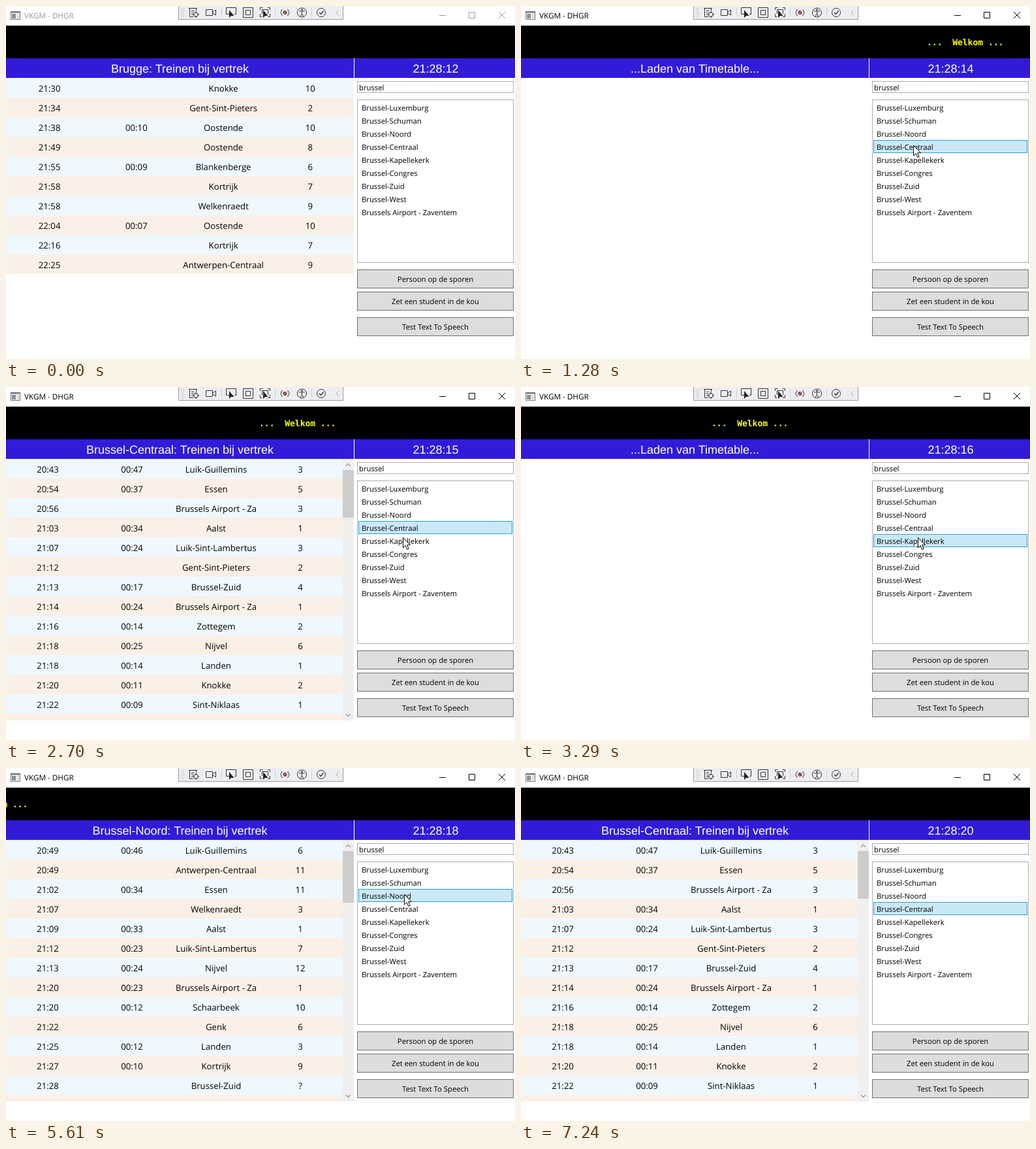
An HTML page for the animation above (8.04 s loop, 780 px wide and 540 px high).

```html
<!DOCTYPE html>
<html lang="nl">
<head>
<meta charset="utf-8">
<title>Vertrektijden</title>
<style>
  html, body { margin: 0; width: 100%; height: 100%; overflow: hidden; background: #fff; }
  #stage { position: relative; width: 780px; height: 540px; overflow: hidden; }
  svg { position: absolute; inset: 0; }
  svg, .board { font: 11.3px "Open Sans", "Noto Sans", sans-serif; text-rendering: geometricPrecision; }
  .middle { text-anchor: middle; }
  .head { font: 18px "Liberation Sans", Arial, sans-serif; fill: #fff; text-anchor: middle; }
  .ticker { font: bold 13px "DejaVu Sans Mono", monospace; fill: #ff0; white-space: pre; }
  .line { fill: none; stroke: #333; }
  .field { fill: #fff; stroke: #abadb3; }
  .button { fill: #ddd; stroke: #707070; }
  .selected { fill: #cbe8f6; stroke: #26a0da; }
  .hover { fill: #e5f3fb; stroke: #70c0e7; }
  .board { position: absolute; left: 0; top: 110px; width: 533px; max-height: 400px; overflow: hidden; font-size: 13.2px; }
  .board.long { height: 400px; }
  .row { display: grid; grid-template-columns: repeat(4, 1fr); height: 30px; background: #f0f8ff; }
  .row:nth-child(even) { background: #faf0e6; }
  .long .row { width: 516px; }
  .row span { margin: 0 2.5px; min-width: 0; overflow: hidden; white-space: nowrap; text-align: center; line-height: 32px; height: 30px; }
  .long .row span { position: relative; left: -.5px; }
  .bar { position: absolute; right: 0; top: 0; width: 17px; height: 400px; background: #f0f0f0; }
  .bar i { position: absolute; top: 17px; width: 17px; background: #cdcdcd; }
</style>
</head>
<body>
<div id="stage">
  <svg width="780" height="540" id="ui">
    <!-- window frame -->
    <rect x="7.5" y="8.5" width="14" height="12" fill="#f4f4f4" stroke="#777"/>
    <path d="M7 9.5h15" stroke="#777" stroke-width="2"/>
    <path d="M9 12h6v7H9z" fill="#8b8f96"/>
    <path d="M16.5 13h4m-4 2.5h4m-4 2.5h4" stroke="#bbb"/>
    <g id="frame">
      <text x="28" y="18.5" style="font-size:11.7px">VKGM - DHGR</text>
      <path d="M664 14.5h10M709.5 9.5h9v9h-9zM755 9l10 10m0-10-10 10" fill="none" stroke="currentColor"/>
    </g>
    <!-- floating toolbar -->
    <path d="M264.5-1v21.500h252V-1z" fill="#eeeef2" stroke="#9b9ba3"/>
    <path d="M268.500 3v15M272.500 3v15" stroke="#999" stroke-dasharray="1 3"/>
    <path d="M270.500 5v13" stroke="#999" stroke-dasharray="1 3"/>
    <path d="M330.500 3v14M412.500 3v14M468.500 3v14" stroke="#ccced6"/>
    <g class="line">
      <path d="M287 16.500h-5.500v-13h10v4M280 3.500h13M284 7.500h4m-4 3h3m-3 3h2"/>
      <circle cx="291" cy="13" r="3.500"/><path d="M291 8v3m0 4v3m-5-5h3m4 0h3"/>
      <path d="M306.500 5.500h10v9h-10zM317 9l4.500-3v8L317 11"/>
      <path d="M343 12.500h-5.500v-10h15v10H350M363.500 2.500h15v15h-15zM367.500 6.500h7v7h-7z"/>
      <path d="M389.500 6V2.500h4M401 2.500h3.500V6M389.500 12v4.500h3M401 16.500h3.500V12M392.500 12V5.500h9V12"/>
      <path d="M424 5.500q-2 0-2 2t-1.500 2.500q1.500.5 1.500 2.500t2 2M431 5.500q2 0 2 2t1.500 2.500q-1.500.5-1.500 2.500t-2 2"/>
      <circle cx="453.500" cy="10" r="7"/><path d="M449 8h9m-4.500 0v4m0 0-2.500 4m2.500-4 2.500 4"/>
      <circle cx="483" cy="10" r="6.500"/><path d="M480 10l2.500 2.500 4-5" stroke-width="1.400"/>
    </g>
    <path d="M342 6v12l3-3h4.500zM394 6v12l3-3h4.500z" fill="#222"/>
    <circle cx="453.500" cy="5.800" r="1.300" fill="#333"/>
    <circle cx="427.500" cy="10" r="3" fill="#7d3038"/><path d="M426 11.500l3-3" stroke="#fff"/>
    <path d="M510 6l-4 4 4 4" fill="none" stroke="#aaa"/>
    <!-- banner and headings -->
    <path d="M0 30h780v50H0z"/>
    <text class="ticker" id="ticker" y="60">...  Welkom ...</text>
    <path d="M0 80h780v30H0z" fill="#311bd9"/>
    <path d="M533.500 80v30" stroke="#fff"/>
    <text class="head" id="heading" x="266.500" y="102"></text>
    <text class="head" id="clock" x="658.500" y="102"></text>
    <!-- side panel -->
    <rect class="field" x="538.500" y="115.500" width="239" height="17"/>
    <text x="541" y="129">brussel</text>
    <rect class="field" x="538.500" y="143.500" width="239" height="249"/>
    <rect class="hover" id="hover" x="540.500" width="235" height="19"/>
    <rect class="selected" id="selected" x="540.500" width="235" height="19"/>
    <g id="stations"></g>
    <g id="buttons"></g>
    <path id="cursor" d="M.5.500v15.500l3.600-3.400 2.600 5.900 2.500-1.100-2.600-5.700h4.900z" fill="#fff" stroke="#000"/>
  </svg>
</div>
<script>
const LOOP = 8040;
const $ = id => document.getElementById(id);
const stage = $('stage');

const boards = {
  'Brugge': { rows: `21:30,,Knokke,10|21:34,,Gent-Sint-Pieters,2|21:38,00:10,Oostende,10|21:49,,Oostende,8|
    21:55,00:09,Blankenberge,6|21:58,,Kortrijk,7|21:58,,Welkenraedt,9|22:04,00:07,Oostende,10|
    22:16,,Kortrijk,7|22:25,,Antwerpen-Centraal,9` },
  'Brussel-Centraal': { thumb: 73, rows: `20:43,00:47,Luik-Guillemins,3|20:54,00:37,Essen,5|
    20:56,,Brussels Airport - Zaventem,3|21:03,00:34,Aalst,1|21:07,00:24,Luik-Sint-Lambertus,3|
    21:12,,Gent-Sint-Pieters,2|21:13,00:17,Brussel-Zuid,4|21:14,00:24,Brussels Airport - Zaventem,1|
    21:16,00:14,Zottegem,2|21:18,00:25,Nijvel,6|21:18,00:14,Landen,1|21:20,00:11,Knokke,2|
    21:22,00:09,Sint-Niklaas,1|,,,` },
  'Brussel-Kapellekerk': {},
  'Brussel-Noord': { thumb: 79, rows: `20:49,00:46,Luik-Guillemins,6|20:49,,Antwerpen-Centraal,11|
    21:02,00:34,Essen,11|21:07,,Welkenraedt,3|21:09,00:33,Aalst,1|21:12,00:23,Luik-Sint-Lambertus,7|
    21:13,00:24,Nijvel,12|21:20,00:23,Brussels Airport - Zaventem,1|21:20,00:12,Schaarbeek,10|
    21:22,,Genk,6|21:25,00:12,Landen,3|21:27,00:10,Kortrijk,9|21:28,,Brussel-Zuid,?|,,,` }
};
const stations = ['Brussel-Luxemburg', 'Brussel-Schuman', 'Brussel-Noord', 'Brussel-Centraal',
  'Brussel-Kapellekerk', 'Brussel-Congres', 'Brussel-Zuid', 'Brussel-West', 'Brussels Airport - Zaventem'];
const buttons = [['Persoon op de sporen', 403], ['Zet een student in de kou', 437], ['Test Text To Speech', 476]];

// [time, value]; an empty board name means the timetable is loading
const views = [[0, 'Brugge'], [1180, ''], [1580, 'Brussel-Centraal'], [2800, ''], [3490, 'Brussel-Kapellekerk'],
  [4710, ''], [5110, 'Brussel-Noord'], [6640, ''], [6940, 'Brussel-Centraal']];
const selections = [[0, -1], [1180, 3], [2800, 4], [4710, 2], [6640, 3]];
const tickerPath = [[180, 805], [1280, 622], [2000, 502], [3290, 292], [4510, 96], [5610, -84], [5820, -119]];
const cursorPath = [[380, 499, 395], [980, 601, 213], [2400, 601, 213], [2700, 608, 230], [4210, 608, 230],
  [4510, 609, 203], [4610, 610, 193], [5820, 610, 193], [6220, 611, 214], [6940, 611, 214], [7140, 610, 242]];

// The screen refreshes in runs of 100 ms steps: [start, count]
const ticks = [[0, 1], [180, 18], [2000, 12], [3190, 5], [3710, 21], [5820, 1], [6020, 3], [6640, 1], [6940, 1], [7140, 2]]
  .flatMap(([start, count]) => Array.from({ length: count }, (_, i) => start + i * 100));

const valueAt = (steps, t) => steps.findLast(([start]) => start <= t)[1];

function pointAt(path, t) {
  const i = path.findIndex(([time]) => time >= t);
  if (i < 0) return path.at(-1).slice(1);
  if (i === 0) return path[0].slice(1);
  const [a, b] = [path[i - 1], path[i]];
  const k = (t - a[0]) / (b[0] - a[0]);
  return a.slice(1).map((v, n) => v + (b[n + 1] - v) * k);
}

function build() {
  for (const board of Object.values(boards)) {
    if (!board.rows) continue;
    const el = board.el = document.createElement('div');
    el.className = board.thumb ? 'board long' : 'board';
    el.innerHTML = board.rows.split('|').map(row =>
      `<div class="row">${row.trim().split(',').map(cell => `<span>${cell}</span>`).join('')}</div>`).join('');
    if (board.thumb) el.innerHTML += `<div class="bar"><i style="height:${board.thumb}px"></i>
      <svg width="17" height="400"><path d="M5 11l3.500-3.500L12 11M5 390l3.500 3.500L12 390" fill="none" stroke="#999" stroke-width="1.300"/></svg></div>`;
    stage.append(el);
  }
  $('stations').innerHTML = stations.map((name, i) => `<text x="545" y="${160 + 20 * i}">${name}</text>`).join('');
  $('buttons').innerHTML = buttons.map(([label, y]) =>
    `<rect class="button" x="538.500" y="${y + .5}" width="239" height="28"/>
     <text class="middle" x="658" y="${y + 19}">${label}</text>`).join('');
}

function show(el, visible) { el.style.display = visible ? '' : 'none'; }

function placeItem(el, index) {
  show(el, index >= 0);
  if (index >= 0) el.setAttribute('y', 145.5 + 20 * index);
}

// The highlight trails the pointer by one refresh
function hoveredItem(t) {
  const [x, y] = pointAt(cursorPath, t);
  const index = Math.floor((y - 145) / 20);
  return x > 540 && index < stations.length ? index : -1;
}

function draw(t, before) {
  const name = valueAt(views, t);
  const chosen = valueAt(selections, t);
  const pointing = t >= 380 && t < 7240;
  const hovered = pointing ? hoveredItem(before) : -1;

  for (const [key, board] of Object.entries(boards)) if (board.el) show(board.el, key === name);
  $('heading').textContent = name ? `${name}: Treinen bij vertrek` : '...Laden van Timetable...';
  $('clock').textContent = `21:28:${t < 180 ? 12 : 13 + Math.floor((t - 70) / 1008)}`;
  $('frame').style.color = $('frame').style.fill = t < 1180 ? '#999' : '#000';

  show($('ticker'), t >= 180 && t < 5820);
  $('ticker').setAttribute('x', pointAt(tickerPath, t)[0]);
  placeItem($('selected'), chosen);
  placeItem($('hover'), hovered === chosen ? -1 : hovered);
  show($('cursor'), pointing);
  $('cursor').setAttribute('transform', `translate(${pointAt(cursorPath, t).map(Math.round)})`);
}

let shown = -1;
function frame() {
  const now = performance.now() % LOOP;
  const i = ticks.findLastIndex(time => time <= now);
  if (i !== shown) draw(ticks[i], ticks[Math.max(0, i - 1)]);
  shown = i;
  requestAnimationFrame(frame);
}

build();
frame();
</script>
</body>
</html>
```
